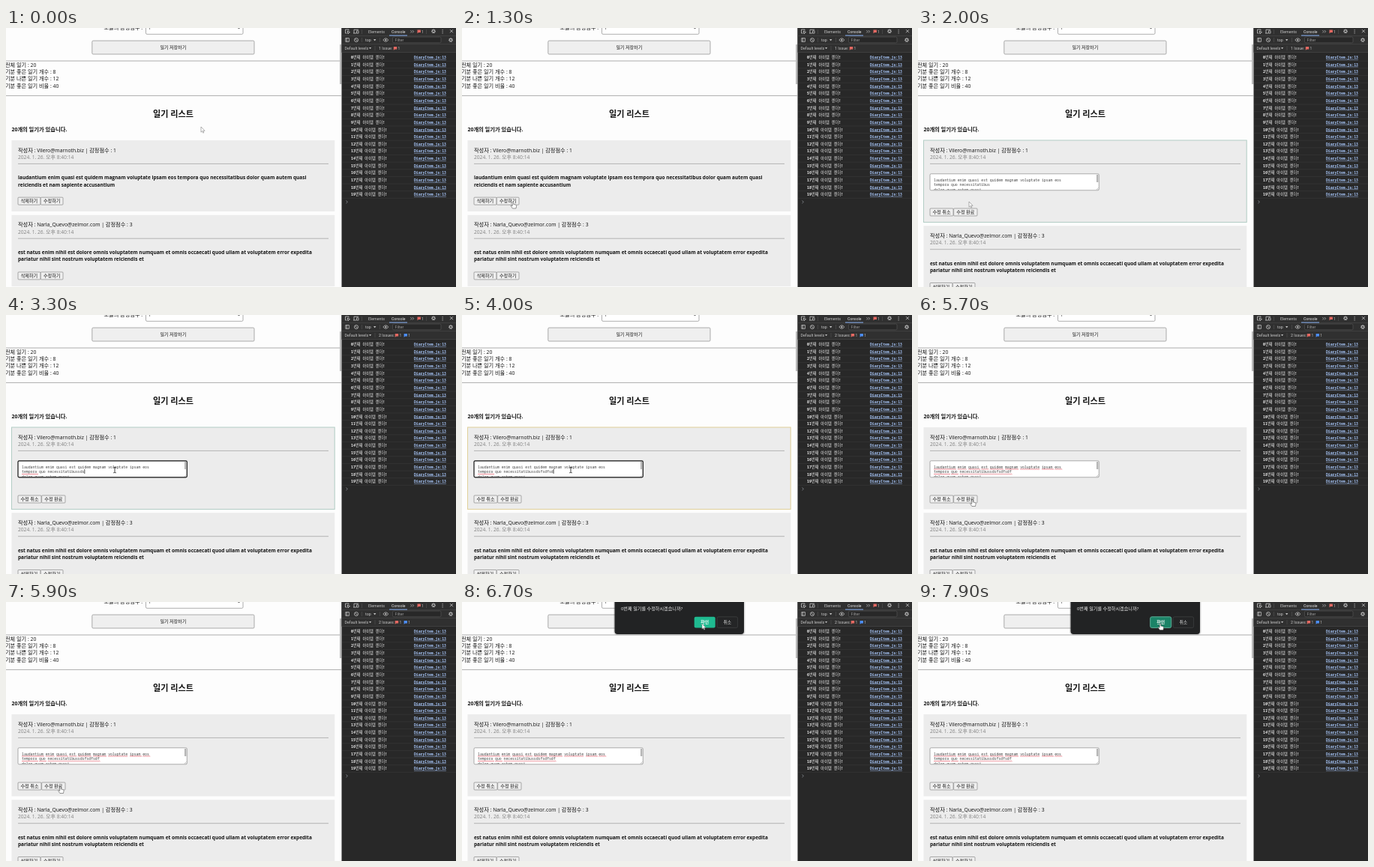
Write an HTML page that moves like this. It is 600 px wide and 346 px high and loops after 8000 ms.

```html
<!DOCTYPE html>
<html lang="ko">
<head>
<meta charset="utf-8">
<style>
html, body { margin: 0; width: 100%; height: 100%; overflow: hidden; background: #fdfdfd; }
svg { display: block; }
text { font-family: "Open Sans", "Noto Sans CJK KR", "Noto Sans CJK", sans-serif; white-space: pre; }
.mono { font-family: "Noto Sans Mono", "Noto Sans CJK KR", "Noto Sans CJK", monospace; }
.ui { font-family: Roboto, sans-serif; }
.b { font-weight: 700; }
.semi { font-weight: 600; }
.k { font-size: 1.06em; }
.semi .k { font-weight: 400; }
.mid { text-anchor: middle; }
.link { text-decoration: underline; }
</style>
</head>
<body>
<svg id="stage" width="600" height="346" viewBox="0 0 600 346"></svg>
<script>
const LOOP = 8000, STEP = 100;
const CELL = 2.88; // width of one character in the text area

const text = (x, y, size, str, fill = '#111', cls = '') =>
  `<text x="${x}" y="${y}" font-size="${size}" fill="${fill}" class="${cls}">` +
  str.replace(/[가-힣]+/g, '<tspan class="k">$&</tspan>') + '</text>';
const rect = (x, y, w, h, fill, extra = '') =>
  `<rect x="${x}" y="${y}" width="${w}" height="${h}" fill="${fill}" ${extra}/>`;
const path = (d, stroke, width = 0.8, fill = 'none', extra = '') =>
  `<path d="${d}" stroke="${stroke}" stroke-width="${width}" fill="${fill}" ${extra}/>`;
const group = (id, body, extra = '') => `<g id="${id}" ${extra}>${body}</g>`;
const line = (x1, x2, y, color, width) => path(`M${x1} ${y}H${x2}`, color, width);

const button = (x, y, w, label) =>
  rect(x, y, w, 10, '#efefef', 'rx="1" stroke="#767676" stroke-width=".6"') +
  text(x + w / 2, y + 7.2, 5.8, label, '#111', 'mid');

const cardHead = (mail, score) =>
  text(16, 15.7, 6.8, `작성자 : ${mail} | 감정점수 : ${score}`) +
  text(16, 25.2, 6.65, '2024. 1. 26. 오후 8:40:14', '#808080') +
  line(16, 430, 31.4, '#8b8b8b', 0.6);

const cardBody = (first, second) =>
  text(16, 52.3, 6.5, first, '#111', 'b') +
  text(16, 61.6, 6.5, second, '#111', 'b') +
  button(16, 76.2, 30, '삭제하기') + button(46.3, 76.2, 29.7, '수정하기');

const wave = (col, chars, y) => {
  let d = `M${5 + col * CELL} ${y}`;
  for (let i = 0; i < chars * CELL / 2; i++) d += 'l1 -.8l1 .8';
  return path(d, '#e0394a', 0.6);
};
const waveWords = (str, y) =>
  [...str.matchAll(/\w+/g)].map(m => wave(m.index, m[0].length, y)).join('');

const FIRST = 'laudantium enim quasi est quidem magnam voluptate ipsam eos';
const SECOND = 'tempora quo necessitatibus';
const TYPED = 'sdsfsdfsdf';

const mono = (y, str, id = '') =>
  `<text ${id && `id="${id}"`} class="mono" x="5" y="${y}" font-size="4.8" fill="#444">${str}</text>`;

const editor =
  rect(16, 44.8, 225.3, 22, '#fff', 'id="area" rx="1.5"') +
  `<svg x="16" y="45" width="225" height="21.2">` +
    mono(9.6, FIRST) + mono(16.2, SECOND, 'typed') + mono(22.8, 'dolor quam autem quasi') +
    group('waveOne', wave(0, 7, 18)) +
    group('waveAll', waveWords(FIRST, 11.4) + waveWords(SECOND + TYPED, 18)) +
    path('M0 11v6', '#111', 0.7, 'none', 'id="caret"') +
    rect(222, 1, 2.4, 10, '#b4b4b4') +
  '</svg>' +
  path('M237.8 66l2.7-2.7M239.5 66l1-1', '#888', 0.5) +
  button(16, 91, 31, '수정 취소') + button(47.6, 91, 31.4, '수정 완료');

const page =
  text(130.5, 1.8, 6.8, '오늘의 감정점수 :') +
  rect(186.5, -8, 129.5, 16.3, '#fff', 'rx="1.5" stroke="#777" stroke-width=".6"') +
  text(190, 1.8, 5.8, '1') + path('M308.5 -1l2 2 2-2', '#222') +
  rect(114.8, 17, 216.2, 18, '#efefef', 'rx="1.5" stroke="#777" stroke-width=".6"') +
  text(222.8, 28.4, 5.7, '일기 저장하기', '#111', 'mid') +
  line(0, 447, 44, '#8b8b8b', 0.7) +
  ['전체 일기 : 20', '기분 좋은 일기 개수 : 8', '기분 나쁜 일기 개수 : 12', '기분 좋은 일기 비율 : 40']
    .map((s, i) => text(-1, 52 + i * 9.2, 6.8, s)).join('') +
  line(0, 447, 90.4, '#8b8b8b', 0.7) +
  text(223, 118.8, 10.5, '일기 리스트', '#111', 'b mid') +
  text(7.5, 138, 6.9, '20개의 일기가 있습니다.', '#111', 'b') +
  rect(445, 22, 2.4, 53, '#bbb');

const cards =
  group('card1',
    rect(7.5, 0, 430.7, 95, '#ececec', 'id="back1"') +
    cardHead('Vilero@marnoth.biz', 1) +
    group('view', cardBody(
      'laudantium enim quasi est quidem magnam voluptate ipsam eos tempora quo necessitatibus dolor quam autem quasi',
      'reiciendis et nam sapiente accusantium')) +
    group('edit', editor), 'transform="translate(0 150)"') +
  group('card2',
    rect(7.5, 0, 430.7, 95.3, '#ececec') +
    cardHead('Narla_Quevo@zelmor.com', 3) +
    cardBody(
      'est natus enim nihil est dolore omnis voluptatem numquam et omnis occaecati quod ullam at voluptatem error expedita',
      'pariatur nihil sint nostrum voluptatem reiciendis et'));

const GRAY = '#c7c7c7';
const gear = (x, y) =>
  `<circle cx="${x}" cy="${y}" r="2.2" fill="none" stroke="${GRAY}" stroke-width="1.1" stroke-dasharray="1.2 .55"/>` +
  `<circle cx="${x}" cy="${y}" r="1.5" fill="none" stroke="${GRAY}" stroke-width=".7"/>`;
const ui = (x, y, str, fill = GRAY, size = 5.3) => text(x, y, size, str, fill, 'ui');
const badge = (x, y, color) =>
  path(`M${x} ${y}h4.4v3.4h-2.8l-1.6 1.3z`, 'none', 0, color) + ui(x + 5.6, y + 4, '1', GRAY, 4.9);

const logs = Array.from({ length: 20 }, (_, i) => {
  const y = 39.3 + i * 9.64;
  return text(460, y + 1.8, 4.9, `${i}번째 아이템 렌더!`, '#eee', 'mono semi') +
    text(544, y + 1.8, 4.78, 'DiaryItem.js:13', '#a8c7fa', 'mono semi link') +
    line(448, 600, y + 4.9, '#3d3d3d', 0.5);
}).join('');

const tools =
  rect(447.5, 0, 152.5, 346, '#282828') +
  rect(447.5, 0, 152.5, 32.5, '#303030') +
  path('M447.5 10.5H600M447.5 21.5H600M447.5 32.5H600', '#4a4a4a', 0.6) +
  path('M457 3.5v-1.5h-4.5v5h2M455 4l1.2 4 .8-1.6 1.6-.8z', GRAY) +
  path('M464 7v-4.8h6M463 7h4M467.5 3.8h2.5v3.2h-2.5z', GRAY) +
  path('M474.5 2v6M560.5 2v6', '#555', 0.6) +
  ui(483, 6.6, 'Elements') + ui(514, 6.6, 'Console', '#e8e8e8', 5.1) +
  line(511, 535, 10, '#8ab4f8', 1) +
  path('M539.4 3l1.6 1.7-1.6 1.7M542 3l1.6 1.7-1.6 1.7', GRAY, 0.7) +
  badge(548.5, 2.6, '#e46962') + gear(570, 4.3) +
  [2.2, 4.3, 6.4].map(y => rect(581.6, y, 1, 1, GRAY)).join('') +
  path('M592 2.2l4 4M596 2.2l-4 4', GRAY) +
  path('M452.8 13.5h4.6v4.8h-4.6zM454.4 13.5v4.8', GRAY) +
  `<circle cx="467" cy="16" r="2.5" fill="none" stroke="${GRAY}" stroke-width=".8"/>` +
  path('M465.3 14.3l3.4 3.4', GRAY) +
  ui(479, 18, 'top') + path('M490 15h3.4l-1.7 2.2z', 'none', 0, GRAY) +
  path('M474.5 13v6M498.5 13v6', '#555', 0.6) +
  path('M502.8 16q3.5-4.4 7 0q-3.5 4.4-7 0z', GRAY) + `<circle cx="506.3" cy="16" r="1.1" fill="${GRAY}"/>` +
  rect(515.5, 12, 64.5, 7.8, '#282828', 'rx="1.5" stroke="#5c5c5c" stroke-width=".6"') +
  ui(518.5, 17.9, 'Filter', '#9a9a9a') +
  gear(593, 16) +
  ui(451.5, 28.8, 'Default levels') + path('M484 26h3.2l-1.6 2.1z', 'none', 0, GRAY) +
  path('M492 24v6', '#555', 0.6) +
  group('issue1', ui(497, 28.8, '1 Issue:') + badge(516.8, 25, '#e46962')) +
  group('issue2', ui(497, 28.8, '2 Issues:') + badge(518.8, 25, '#e46962') + badge(530.6, 25, '#4c8df6')) +
  logs + path('M453.5 230.6l1.9 1.8-1.9 1.8', '#9aa0a6', 0.7);

const dialog = group('dialog',
  rect(202, -8, 175.5, 52.5, '#000', 'rx="5" opacity=".13"') +
  rect(203.5, -8, 172.5, 51, '#222324', 'rx="4"') +
  text(212, 11.2, 5.8, '0번째 일기를 수정하시겠습니까?', '#f1f1f1') +
  rect(309.7, 19.8, 28, 14.6, '#1fba90', 'id="ok" rx="2"') +
  text(323.7, 29.2, 5.5, '확인', '#fff', 'mid b') +
  rect(340, 19.8, 27.6, 14.6, '#242526', 'rx="2" stroke="#434445" stroke-width=".7"') +
  text(353.8, 29.2, 5.5, '취소', '#e4e4e4', 'mid'));

const cursor = group('cursor',
  path('M0 0V7.2L1.7 5.7 2.8 8.2 3.9 7.7 2.8 5.3H5.1Z', '#666', 0.5, '#fff', 'id="arrow"') +
  path('M-.8 .6Q0-.5.8.6V3.6l1.4.2 1.6.5q.9.3.8 1.4l-.6 3.3H-.6L-2.8 5.8q-.1-1.2 1.1-.7l.9.8z', '#333', 0.5, '#fff', 'id="hand"') +
  path('M-1.8-3.8Q0-3.8 0-3Q0-3.8 1.8-3.8M0-3V3M-1.8 3.8Q0 3.8 0 3Q0 3.8 1.8 3.8', '#111', 0.8, 'none', 'id="beam"'));

const $ = id => document.getElementById(id);
$('stage').innerHTML = page + cards + tools + dialog + cursor;

// time, x, y of the pointer
const route = [
  [0, 260, 132], [300, 260, 132], [1300, 68, 232], [2100, 68, 232], [2700, 145, 207],
  [4300, 145, 207], [4800, 105, 236], [5300, 72.5, 246.5], [6000, 72.5, 246.5],
  [6600, 320, 29], [6800, 320, 29], [7100, 323, 28.5], [LOOP, 323, 28.5]
];
const shapes = [
  [0, 'arrow'], [1300, 'hand'], [1900, 'arrow'], [2400, 'beam'], [4600, 'arrow'],
  [5200, 'hand'], [6100, 'arrow'], [6900, 'hand']
];
const borders = [[0, 'none'], [1900, '#b3cdc5'], [3700, '#e0d09a'], [5400, 'none']];

const current = (list, t) => list.findLast(e => e[0] <= t)[1];
const show = (id, on) => { $(id).style.display = on ? '' : 'none'; };

function pointer(t) {
  const i = route.findIndex(p => p[0] > t);
  const [t0, x0, y0] = route[i - 1], [t1, x1, y1] = route[i];
  const u = (t - t0) / (t1 - t0), e = u * u * (3 - 2 * u);
  return [x0 + (x1 - x0) * e, y0 + (y1 - y0) * e];
}

function draw(t) {
  const editing = t >= 1900, focused = t >= 2800 && t < 5600, left = t >= 5600;
  show('view', !editing);
  show('edit', editing);
  $('back1').setAttribute('height', editing ? 109.5 : 95);
  $('back1').setAttribute('stroke', current(borders, t));
  $('card2').setAttribute('transform', `translate(0 ${editing ? 264.3 : 249.8})`);

  const count = Math.max(0, Math.min(TYPED.length, Math.floor((t - 2950) / 115)));
  $('typed').textContent = SECOND + TYPED.slice(0, count);
  $('area').setAttribute('stroke', focused ? '#111' : '#767676');
  $('area').setAttribute('stroke-width', focused ? 1.2 : 0.6);
  show('waveOne', focused);
  show('waveAll', left);
  show('caret', focused && (t < 4200 || t % 1000 >= 500));
  $('caret').setAttribute('transform', `translate(${5.3 + (SECOND.length + count) * CELL} 0)`);

  show('issue1', t < 2800);
  show('issue2', t >= 2800);
  show('dialog', t >= 6000);
  $('ok').setAttribute('fill', t >= 6900 ? '#1b8367' : '#1fba90');
  $('ok').setAttribute('stroke', t >= 6900 ? '#5fae98' : 'none');

  const shape = current(shapes, t);
  for (const id of ['arrow', 'hand', 'beam']) show(id, id === shape);
  $('cursor').setAttribute('transform', `translate(${pointer(t)})`);
}

const start = performance.now();
function tick() {
  const t = (performance.now() - start) % LOOP;
  draw(Math.floor(t / STEP) * STEP);
  requestAnimationFrame(tick);
}
tick();
</script>
</body>
</html>
```
